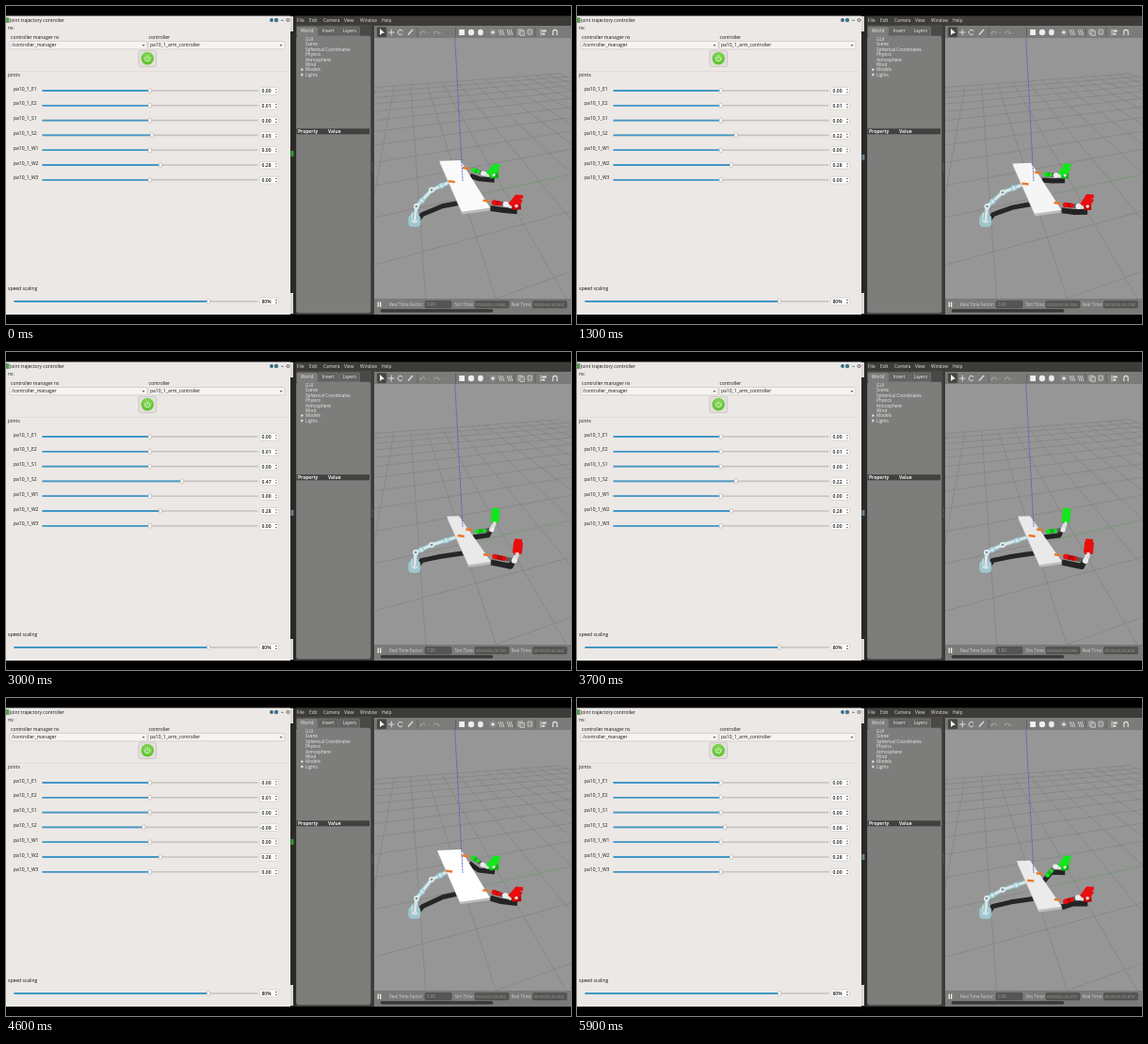
Recreate the animation shown at these times as an HTML page with a canvas. Size 600 px wide and 338 px high, loop 6 s.

```html
<!DOCTYPE html>
<html lang="en">
<head>
<meta charset="utf-8">
<title>Joint trajectory controller</title>
<style>
  html, body { margin: 0; width: 100%; height: 100%; overflow: hidden; background: #000; }
  canvas { display: block; width: 600px; height: 338px; }
</style>
</head>
<body>
<canvas id="stage"></canvas>
<script>
const LOOP = 6000, STEP = 100;
const canvas = document.getElementById('stage');
const dpr = window.devicePixelRatio || 1;
canvas.width = 600 * dpr;
canvas.height = 338 * dpr;
let g = canvas.getContext('2d');

/* ---------- motion ---------- */

// How the S2 slider is dragged: [ms, value]
const drag = [[0, .03], [600, .13], [1300, .22], [2000, .22], [2400, .47],
  [3430, .47], [4035, -.09], [4700, -.09], [5250, .46], [5900, .06]];
const LAG = 550, ARM_DELAY = 500;

const mix = (a, b, k) => a + (b - a) * k;
const clamp = k => Math.max(0, Math.min(1, k));
const smooth = k => (k = clamp(k), k * k * (3 - 2 * k));
const lerp = ([ax, ay], [bx, by], k) => [mix(ax, bx, k), mix(ay, by, k)];
const move = ([x, y], dx, dy) => [x + dx, y + dy];

function joint(t) {
  const i = Math.max(1, drag.findIndex(([end]) => t <= end));
  const [t0, a] = drag[i - 1], [t1, b] = drag[i];
  return mix(a, b, clamp((t - t0) / (t1 - t0)));
}

// The board follows the slider; the arms rise late but sink with the board
const tilt = t => clamp((joint(t - LAG) + .09) / .55);
const lift = t => smooth((Math.min(tilt(t), tilt(t - ARM_DELAY)) - .15) / .45);

/* ---------- drawing helpers ---------- */

function box(x, y, w, h, fill) {
  g.fillStyle = fill;
  g.fillRect(x, y, w, h);
}

function frame(x, y, w, h, fill, edge, r = 1.5) {
  g.beginPath();
  g.roundRect(x, y, w, h, r);
  g.fillStyle = fill;
  g.fill();
  g.strokeStyle = edge;
  g.lineWidth = .6;
  g.stroke();
}

function trace(pts) {
  g.beginPath();
  pts.forEach(([x, y]) => g.lineTo(x, y));
}

function line(pts, color, width = 1) {
  trace(pts);
  g.strokeStyle = color;
  g.lineWidth = width;
  g.stroke();
}

function poly(pts, fill) {
  trace(pts);
  g.closePath();
  g.fillStyle = fill;
  g.fill();
}

function dot(x, y, r, fill) {
  g.beginPath();
  g.arc(x, y, r, 0, 7);
  g.fillStyle = fill;
  g.fill();
}

function arc(x, y, r, from, to, color, width = 1) {
  g.beginPath();
  g.arc(x, y, r, from, to);
  g.strokeStyle = color;
  g.lineWidth = width;
  g.stroke();
}

function text(s, x, y, color = '#141414', size = 5, weight = 500, align = 'left') {
  g.font = `${weight} ${size}px "Open Sans", sans-serif`;
  g.textAlign = align;
  g.fillStyle = color;
  g.fillText(s, x, y);
}

const caret = (x, y, s, fill, dir = 1) =>
  poly([[x - s, y - s * dir / 2], [x + s, y - s * dir / 2], [x, y + s * dir / 2]], fill);

function inScene(paint) {
  g.save();
  g.beginPath();
  g.rect(391, 34, 209, 277);
  g.clip();
  paint();
  g.restore();
}

/* ---------- controller window ---------- */

function slider(y, at, x0 = 38.5) {
  line([[x0, y], [267.5, y]], '#c6c2be', 1.6);
  line([[x0, y], [at, y]], '#4297c6', 1.8);
  frame(at - 1.7, y - 2.4, 3.4, 4.8, '#f8f7f6', '#b3afab', 1.2);
}

function spin(y, value) {
  frame(269.5, y - 3.8, 20, 7.6, '#fff', '#c9c4c0');
  text(value, 281.5, y + 1.8, '#141414', 5, 600, 'right');
  caret(287, y - 1.7, 1.2, '#444', -1);
  caret(287, y + 1.7, 1.2, '#444');
}

function combo(x, w, label) {
  frame(x, 37.5, w, 8.3, '#f6f4f2', '#c5c0bc');
  text(label, x + 2, 43.4);
  caret(x + w - 4, 42, 1.3, '#222');
}

const joints = ['E1', 'E2', 'S1', 'S2', 'W1', 'W2', 'W3'];
const rowY = i => 90 + i * 15.8;

function powerButton() {
  frame(140.8, 47.3, 18.8, 17.2, '#e3dfdc', '#bcb7b3', 2);
  dot(150.2, 55.8, 6.7, '#62c432');
  dot(150.2, 54.6, 5, '#7cd44e');
  arc(150.2, 56, 2.6, -.9, Math.PI + .9, '#dcf5cf');
  line([[150.2, 52.4], [150.2, 55.8]], '#dcf5cf');
}

function controllerPanel() {
  box(0, 10.5, 302, 317.5, '#ece8e5');
  frame(0, 12.5, 3, 5, '#57a552', '#467f42', .5);
  text('Joint trajectory controller', 4, 16.9);
  dot(282, 15, 1.9, '#34657f');
  dot(287, 15, 2.2, '#3c7891');
  line([[292, 15.3], [295, 15.3]], '#555', .7);
  arc(299.5, 15, 1.5, 0, 7, '#444', .8);
  text('ns:', 2, 24.8);
  text('controller manager ns', 5, 34.8);
  text('controller', 151.5, 34.8);
  combo(4, 146, '/controller_manager');
  combo(151, 145, 'pa10_1_arm_controller');
  powerButton();
  line([[1, 69.5], [299, 69.5]], '#dcd7d4', .6);
  text('joints', 2, 75.2);
  const fixed = { E2: '0.01', W2: '0.28' };
  joints.forEach((name, i) => {
    text('pa10_1_' + name, 8, rowY(i) - .4);
    if (name === 'S2') return;
    slider(rowY(i), name === 'W2' ? 164 : 152.8);
    spin(rowY(i) + .3, fixed[name] || '0.00');
  });
  text('speed scaling', 2, 301.7);
  slider(314, 215, 8.5);
  spin(314, '80%');
}

/* ---------- simulator window ---------- */

// Ground point to screen, camera pitched down 42 degrees
function ground(x, y) {
  const yaw = .28, cy = Math.cos(yaw), sy = Math.sin(yaw);
  const ahead = 2.56 + y * sy - x * cy;
  const depth = ahead * .743 + 2.05;
  return [495 + 181 * (y * cy + x * sy - .2) / depth, 178 + 181 * (2.28 - ahead * .669) / depth];
}

function grid() {
  const span = Array.from({ length: 81 }, (_, i) => i / 4 - 10);
  const inFront = ([x, y]) => y > 40 && y < 600 && Math.abs(x - 495) < 1500;
  for (let i = -10; i <= 10; i++) {
    line(span.map(u => ground(u, i)).filter(inFront), '#7f7f7f', .6);
    line(span.map(u => ground(i, u)).filter(inFront), '#7f7f7f', .6);
  }
  line([ground(0, 0), ground(0, 10)], '#76a472', .6);
}

function toolbar() {
  const ink = '#e4e4e2', dim = '#a5a5a2';
  box(391, 21, 209, 13, '#7b7b7a');
  frame(394, 22.5, 10, 10.5, '#454543', '#5d5d5b', 1);
  poly([[397, 24], [402, 28.5], [399.6, 29], [397, 31]], '#f4f4f4');
  line([[406, 28], [412.5, 28]], ink, .9);
  line([[409.2, 24.6], [409.2, 31.4]], ink, .9);
  arc(418.8, 28, 2.6, .5, 5.8, ink);
  line([[427, 30.5], [432, 25]], ink, 1.2);
  for (const [x, d] of [[443, 1], [457, -1]]) {
    arc(x, 29.5, 2.6, Math.PI, 2 * Math.PI, dim);
    caret(x - 2.6 * d, 29.5, 1.6, dim);
    caret(x + 6, 28.5, 1, dim);
  }
  for (const x of [437, 477.5, 540, 562]) line([[x, 23], [x, 33]], '#5b5b59', .8);
  box(481.2, 25, 5.8, 6, '#f0f0f0');
  dot(494, 28, 3.2, '#ededed');
  frame(501.3, 25, 5.2, 6, '#ededed', '#d8d8d8', 2);
  dot(517, 28, 1.8, ink);
  for (let i = 0; i < 8; i++) {
    const c = Math.cos(i * Math.PI / 4), s = Math.sin(i * Math.PI / 4);
    line([[517 + 2.5 * c, 28 + 2.5 * s], [517 + 3.6 * c, 28 + 3.6 * s]], ink, .6);
  }
  for (const x of [523, 532])
    for (let i = 0; i < 3; i++) line([[x + i * 2, 25], [x + 2 + i * 2, 31]], ink, .7);
  for (const x of [544, 546, 554]) frame(x, x === 546 ? 26.3 : 25, 4.5, 5.2, '#8e8e8c', ink, .5);
  line([[568, 24.5], [568, 31.5]], ink, .8);
  box(569.3, 25.5, 4.5, 2, ink);
  box(569.3, 28.7, 3, 2, ink);
  arc(583, 27.5, 2.2, Math.PI, 2 * Math.PI, ink, 1.2);
  for (const x of [580.8, 585.2]) line([[x, 27.5], [x, 31]], ink, 1.2);
}

function statusBar() {
  box(391, 311, 209, 17, '#7a7a79');
  for (const x of [394.6, 397]) box(x, 314.6, 1.3, 5.4, '#f2f2f2');
  const label = { 'Real Time Factor:': 407, 'Sim Time:': 476.5, 'Real Time:': 536.5 };
  for (const name in label) text(name, label[name], 318.9, '#d2d2d0', 4.5);
  for (const [x, w] of [[445, 28], [498, 36], [559.5, 36]]) frame(x, 313.5, w, 7.4, '#555553', '#4a4a48', 1);
  frame(398, 322.6, 119, 2.6, '#3a3a38', '#333', 1.3);
}

function modelPanel() {
  box(308, 20, 80, 12, '#4a4947');
  let x = 309;
  for (const name of ['World', 'Insert', 'Layers']) {
    const on = x === 309;
    frame(x, 22, 21.5, 10, on ? '#7d7d7c' : '#626260', '#7d7d7c', 1);
    text(name, x + 10.7, 28.4, '#eeeeec', 4.8, 500, 'center');
    x += 22.5;
  }
  frame(308.5, 32, 78.5, 294, '#7d7d7c', '#7d7d7c', 2);
  const tree = ['GUI', 'Scene', 'Spherical Coordinates', 'Physics', 'Atmosphere', 'Wind', 'Models', 'Lights'];
  tree.forEach((name, i) => {
    const y = 35.3 + i * 5.38;
    text(name, 318, y + 1.7, '#ececea', 4.7);
    if (i > 5) poly([[313.5, y - 1.7], [316, y], [313.5, y + 1.7]], '#f2f2f2');
  });
  box(308.5, 130.3, 77.5, 6, '#41413f');
  text('Property', 310, 135, '#f2f2f2', 4.9, 700);
  text('Value', 342, 135, '#f2f2f2', 4.9, 700);
  for (let i = 0; i < 4; i++) dot(389.2, 167 + i * 2.5, .5, '#8b8984');
}

function simulatorPanel() {
  box(302, 10.5, 6, 317.5, '#2b2a29');
  // edges of the window behind
  box(302, 11, 3, 16, '#dcd9d6');
  box(302, 305, 3, 22, '#dcd9d6');
  box(308, 10.5, 292, 317.5, '#3d3c39');
  const menu = { File: 309, Edit: 322, Camera: 337, View: 359, Window: 376, Help: 399 };
  for (const name in menu) text(name, menu[name], 16.7, '#e3dfd7', 4.8);
  modelPanel();
  box(391, 34, 209, 277, '#969696');
  inScene(grid);
  toolbar();
  statusBar();
}

/* ---------- robots ---------- */

// Far and near ends of the board, narrowing as it tips
function boardCorners(k) {
  const end = (x, y, half, skew) => [[x - half, y + half * skew], [x + half, y - half * skew]];
  const [tl, tr] = end(470.5 + 4 * k, 161.5 + 13 * k, 12.5 - 6 * k, .04);
  const [bl, br] = end(498 + 5 * k, 214.5 + 10 * k, 16 - 4 * k, .14);
  return { tl, tr, br, bl };
}

function grip([x, y]) {
  line([[x - 3, y - .3], [x + 4, y + .6]], '#e8792a', 2.4);
}

function frontArm(wrist, k) {
  const shoulder = [436 - k, 213], elbow = [452, 193 + 12 * k];
  const pts = [[434, 228], shoulder, lerp(shoulder, elbow, .35), elbow, lerp(elbow, wrist, .5), wrist];
  line(pts.map(([x, y]) => [x + (236 - y) * .28, y + (230 - y) * .5]), '#262626', 5);
  frame(427.5, 222, 12.5, 12.5, '#a4c6cd', '#8fc9d5', 4);
  frame(430, 219, 8, 12, '#d3e3e6', '#82b9c4', 3);
  line(pts, '#8fb3bb', 5.2);
  line(pts, '#dbe6e8', 3);
  pts.slice(1, -1).forEach(([x, y], i) => {
    dot(x, y, 3, i % 2 ? '#a5d3dd' : '#e4edef');
    dot(x, y, 1.3, i % 2 ? '#e9eff0' : '#7d9299');
  });
}

function sideArm(hold, home, up, size, main, dark) {
  const hub = move(home, 6 * up, up);
  const elbow = move(hub, -7 + 4 * up, -3 + 11 * up);
  const top = move(home, 8 - up, -9 - 2 * up);
  const foot = move(hub, 10 - 10 * up, 2 * up - 1);
  const near = move(hold, 9, 2), mid = lerp(near, elbow, .5);
  line([near, mid, elbow, foot].map(p => move(p, -4, 6)), '#242424', 6 * size);
  line([near, mid], dark, 5 * size);
  line([mid, elbow], '#5d5a5c', 4.5 * size);
  line([elbow, hub], '#dedede', 5 * size);
  line([hub, foot], dark, 8 * size);
  line([hub, top], main, 10 * size);
  line([move(top, -4, -1.5), move(top, 4, -1)], main, 4 * size);
  dot(...near, 2.7 * size, main);
  dot(...mid, 2.3 * size, main);
  dot(...elbow, 3 * size, '#ececec');
  dot(...lerp(hub, foot, .5), 1.8 * size, '#e6dcda');
}

function robots(k, up) {
  const { tl, tr, br, bl } = boardCorners(k);
  const wrist = move(lerp(tl, bl, .42), 2 + 3 * k, -1);
  const far = lerp(tr, br, .13 + .17 * k), near = lerp(tr, br, .85);
  const tone = 255 - 22 * k;
  frontArm(wrist, k);
  sideArm(far, [513, 180], up, .87, '#12e61c', '#0fae18');
  sideArm(near, [537, 213], up, 1, '#ea0d0d', '#b10a0a');
  poly([tl, tr, br, bl].map(p => move(p, .5, 2.6)), '#bdbdbd');
  poly([tl, tr, br, bl], `rgb(${tone},${tone},${tone})`);
  [wrist, far, near].forEach(grip);
  g.setLineDash([2.5, .7]);
  line([[476.7, 34], [485, 186]], '#5257cb', .8);
  g.setLineDash([]);
}

/* ---------- playback ---------- */

const clock = s => `00:00:05:${s.toFixed(3)}`;

function draw(t) {
  const value = joint(t), k = tilt(t), s = t / 1000, y = rowY(3);
  slider(y, 152.8 + value * 72.5);
  spin(y + .3, value.toFixed(2));
  inScene(() => robots(k, lift(t)));

  // sliver of the window behind
  box(302.5, 150 + 18 * k, 3, 6, k < .4 ? '#2da32c' : '#69808a');

  text(k > .98 ? '1.00' : '0.99', 447, 318.9, '#9c9c9a', 4.5);
  text(clock(23.846 + 1.96 * s), 499, 318.9, '#9c9c9a', 4.3);
  text(clock(26.664 + 1.9 * s), 560.5, 318.9, '#9c9c9a', 4.3);
}

// The static windows are painted once and reused
const still = document.createElement('canvas');
still.width = canvas.width;
still.height = canvas.height;
const view = g;
g = still.getContext('2d');
g.scale(dpr, dpr);
box(0, 0, 600, 338, '#000');
controllerPanel();
simulatorPanel();
g = view;
g.scale(dpr, dpr);
g.lineJoin = 'round';

let shown = -1;
const start = performance.now();
function tick() {
  const t = Math.floor((performance.now() - start) % LOOP / STEP) * STEP;
  if (t !== shown) {
    shown = t;
    g.drawImage(still, 0, 0, 600, 338);
    draw(t);
  }
  requestAnimationFrame(tick);
}
tick();
</script>
</body>
</html>
```
